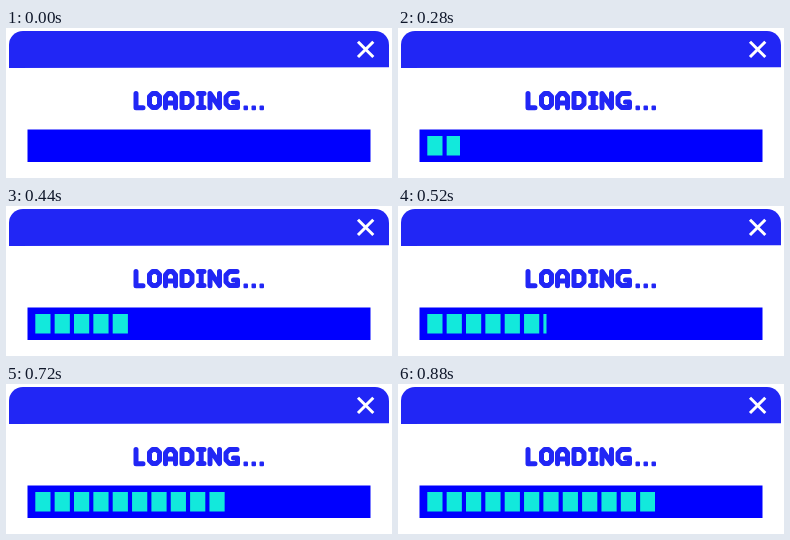
Write an HTML page that moves like this. It is 386 by 150 pixels and loops after 1000 ms.

```html
<!DOCTYPE html>
<html lang="en">
<head>
<meta charset="utf-8">
<title>Loading</title>
<style>
  html, body { margin: 0; width: 100%; height: 100%; overflow: hidden; background: #fff; }
  svg { display: block; width: 386px; height: 150px; }
  .head { fill: #2126f5; }
  .close { fill: none; stroke: #fff; stroke-width: 3; }
  .word { fill: none; stroke: #2126f5; stroke-width: 5; stroke-linejoin: round; stroke-linecap: round; }
  .dots { fill: #2126f5; }
  .track { fill: #00f; }
  .blocks { fill: #12e9dc; }
</style>
</head>
<body>
<svg viewBox="0 0 386 150" role="img" aria-label="LOADING...">
  <path class="head" d="M3 40V17A14 14 0 0 1 17 3H369A14 14 0 0 1 383 17V39.3Z"/>
  <path class="close" d="M352 13.7L367.3 29M367.3 13.7L352 29"/>
  <g class="word">
    <path d="M130 65.5V79.7H137"/>
    <path d="M146.5 65.5h4l3 3v8l-3 3h-4l-3-3v-8z"/>
    <path d="M159.5 79.7V69l3-3.5h4l3 3.5V79.7M159.5 75h10"/>
    <path d="M176 65.5h6.5l3.5 3.5v7l-3.5 3.5h-6.5z"/>
    <path d="M192.5 65.5h5.5M195.2 65.5v14M192.5 79.5h5.5"/>
    <path d="M204 79.7V65.5L213.5 79.5V65.5"/>
    <path d="M231 65.5H223.5l-3.5 3.5v7l3.5 3.5h8V74h-4"/>
  </g>
  <g class="dots">
    <rect x="237.5" y="77.5" width="4.5" height="4.8" rx="1"/>
    <rect x="245.5" y="77.5" width="4.5" height="4.8" rx="1"/>
    <rect x="253.5" y="77.5" width="4.5" height="4.8" rx="1"/>
  </g>
  <rect class="track" x="21.5" y="101.5" width="343" height="32.5"/>
  <clipPath id="wipe"><rect id="edge" x="29" y="100" width="0" height="36"/></clipPath>
  <g class="blocks" id="blocks" clip-path="url(#wipe)"></g>
</svg>
<script>
const LOOP = 1000, TICK = 40, LEFT = 29, COUNT = 12;
// [time in ms, right edge of the fill]
const steps = [
  [0, 29], [120, 29], [200, 41], [280, 62], [360, 86], [440, 124],
  [600, 173], [640, 196], [720, 221], [880, 257], [1000, 257]
];
const edge = document.getElementById('edge');
const blocks = document.getElementById('blocks');

for (let i = 0; i < COUNT; i++) {
  const r = document.createElementNS(blocks.namespaceURI, 'rect');
  const box = { x: 29.3 + 19.35 * i, y: 108, width: 15.2, height: 19.5 };
  for (const key in box) r.setAttribute(key, box[key]);
  blocks.append(r);
}

function edgeAt(t) {
  const n = steps.findIndex(s => s[0] > t);
  const [t0, x0] = steps[n - 1], [t1, x1] = steps[n];
  return x0 + (x1 - x0) * (t - t0) / (t1 - t0);
}

function draw() {
  const t = Math.floor(performance.now() % LOOP / TICK) * TICK;
  edge.setAttribute('width', edgeAt(t) - LEFT);
  requestAnimationFrame(draw);
}
draw();
</script>
</body>
</html>
```
